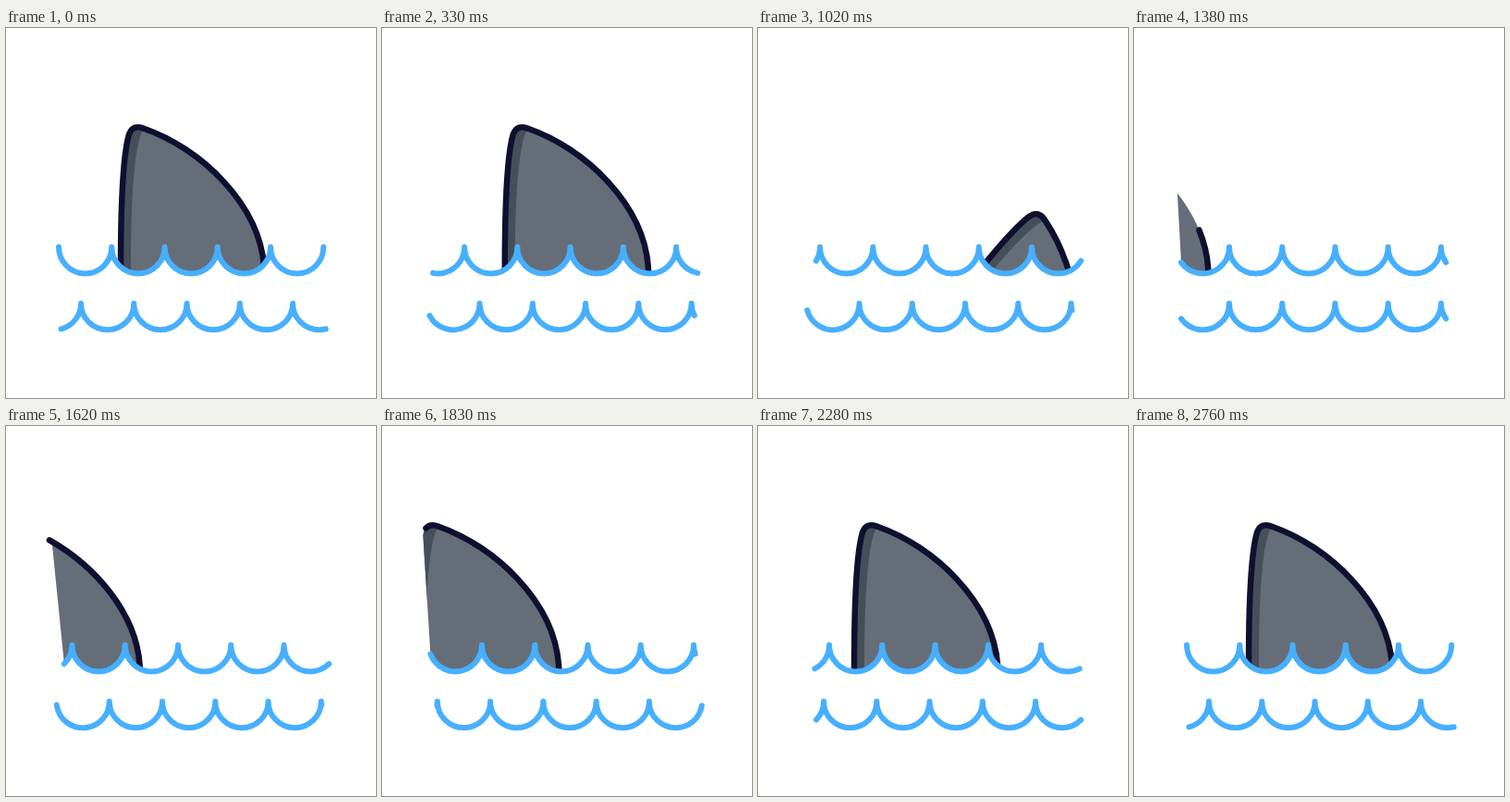
Write an HTML page with a canvas that moves like this. It is 400 by 400 pixels and loops after 4.79 s.

```html
<!DOCTYPE html>
<html lang="en">
<head>
<meta charset="utf-8">
<title>Circling fin</title>
<style>
  html, body { margin: 0; width: 100%; height: 100%; overflow: hidden; background: #fff; }
  canvas { display: block; width: 100vw; height: 100vh; }
</style>
</head>
<body>
<canvas width="400" height="400"></canvas>
<script>
const ctx = document.querySelector('canvas').getContext('2d');
const LOOP = 4790, MOVE_END = 2760, STEP = 30;
const ARC = 57.25, RADIUS = ARC / 2, WAVE_LEFT = 57, ARCS = 5;
const PIVOT = { x: 200, y: 185 };

// Monotone cubic interpolation through (times, values), held at both ends.
function curve(times, values) {
  const slopes = times.slice(1).map((t, i) => (values[i + 1] - values[i]) / (t - times[i]));
  const tangents = times.map((_, i) => {
    const a = slopes[Math.max(i - 1, 0)], b = slopes[Math.min(i, slopes.length - 1)];
    return a * b > 0 ? 2 * a * b / (a + b) : 0;
  });
  return t => {
    if (t <= times[0]) return values[0];
    const i = times.findIndex(k => k >= t) - 1;
    if (i < 0) return values[values.length - 1];
    const span = times[i + 1] - times[i], u = (t - times[i]) / span, v = 1 - u;
    return values[i] * v * v * (1 + 2 * u) + tangents[i] * span * u * v * v
         + values[i + 1] * u * u * (3 - 2 * u) - tangents[i + 1] * span * u * u * v;
  };
}

const waveTimes = [0, 630, 1020, 1380, 1830, 2280, 2760];
const upperShift = curve(waveTimes, [0, -0.895, -1.825, -3.197, -4.11, -4.65, -5]);
const lowerShift = curve(waveTimes, [0.42, 1.262, 1.917, 2.803, 3.05, 3.245, 3.42]);
const returnX = curve([1200, 1380, 1830, 2280, 2760], [-258, -199, -88, -20, 0]);
const outlineLength = curve([1290, 1380, 1680, 1830, 2130], [55, 113, 266, 295, 540]);

const outline = new Path2D(`M283 330 L279 258 C274 190 210 130 150 109
  C142 105.5 136 107 133 115 C127 135 124 190 124 262 L124 330`);
const shade = new Path2D(`M149 108.6 C142 105.5 136 107 133 115 C127 135 124 190 124 262
  L124 330 L135 330 L135 262 C135 190 138 125 149 108.6Z`);

// Five arcs' length of wave; the visible part starts partway into the first arc.
function makeWave(shift, y) {
  const start = ((-shift % 1) + 1) % 1;
  const left = WAVE_LEFT - ARC * start;
  const path = new Path2D();
  for (let k = 0; k <= ARCS; k++) {
    const from = k === 0 ? start : 0, to = k === ARCS ? start : 1;
    path.arc(left + ARC * (k + 0.5), y, RADIUS, Math.PI * (1 - from), Math.PI * (1 - to), true);
  }
  const startX = left + RADIUS * (1 - Math.cos(Math.PI * start));
  return { path, endX: startX + ARC * ARCS, startY: y + RADIUS * Math.sin(Math.PI * start) };
}

function strokeWave(wave) {
  ctx.strokeStyle = '#47afff';
  ctx.lineWidth = 6;
  ctx.stroke(wave.path);
}

function finPose(t) {
  if (t >= 1200) return { x: returnX(t), y: 0, angle: 0 };
  const dive = Math.max(0, t - 432) / 198;
  return { x: 20 * (t / 480) ** 2.2, y: 13 * dive ** 2, angle: 9 * dive ** 1.3 };
}

// Runs paint inside the region above the wave, in the fin's own coordinates.
function aboveWater(wave, leftEdge, pose, paint) {
  ctx.save();
  const region = new Path2D(wave.path);
  region.lineTo(wave.endX, 0);
  for (const [x, y] of leftEdge) region.lineTo(x, y);
  region.closePath();
  ctx.clip(region);
  ctx.translate(PIVOT.x + pose.x, PIVOT.y + pose.y);
  ctx.rotate(pose.angle * Math.PI / 180);
  ctx.translate(-PIVOT.x, -PIVOT.y);
  paint();
  ctx.restore();
}

function drawFin(t, wave) {
  const pose = finPose(t);
  aboveWater(wave, [[37, 0]], pose, () => {
    ctx.fillStyle = '#656e78';
    ctx.fill(outline);
    ctx.fillStyle = '#464f59';
    ctx.fill(shade);
  });
  aboveWater(wave, [[0, 0], [0, wave.startY]], pose, () => {
    ctx.strokeStyle = '#0f1030';
    ctx.lineWidth = 6.5;
    if (t >= 1200) ctx.setLineDash([outlineLength(t), 1000]);
    ctx.stroke(outline);
  });
}

function draw(now) {
  const t = Math.min(Math.floor(now % LOOP / STEP) * STEP, MOVE_END);
  const upper = makeWave(upperShift(t), 236.8);
  ctx.fillStyle = '#fff';
  ctx.fillRect(0, 0, 400, 400);
  ctx.lineCap = ctx.lineJoin = 'round';
  drawFin(t, upper);
  strokeWave(upper);
  strokeWave(makeWave(lowerShift(t), 297.7));
}

let origin;
function tick(now) {
  origin ??= now;
  draw(now - origin);
  requestAnimationFrame(tick);
}
draw(0);
requestAnimationFrame(tick);
</script>
</body>
</html>
```
